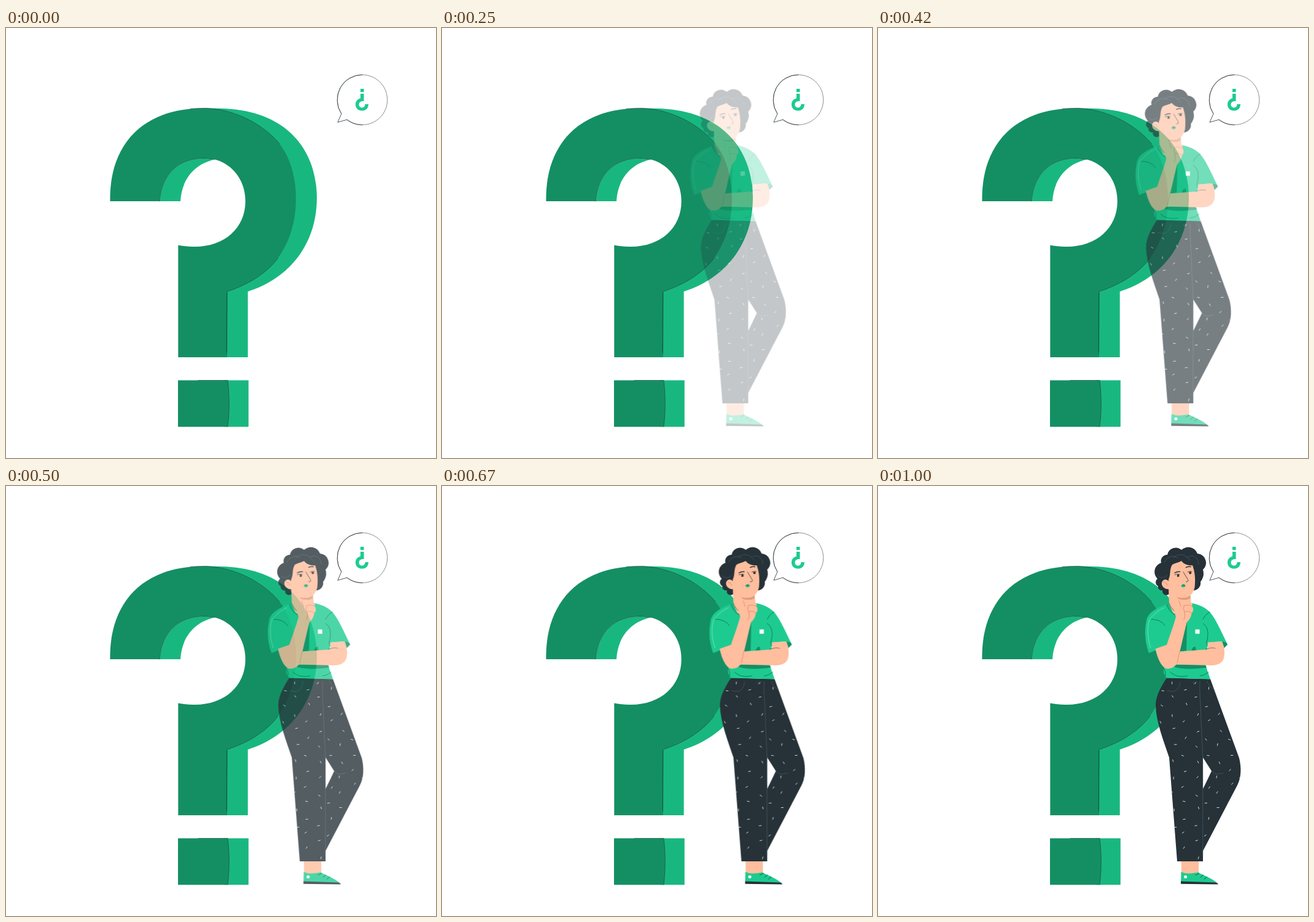
Write an HTML page that moves like this. It is 700x700 px and loops after 1.04 s.

```html
<!DOCTYPE html>
<html lang="en">
<head>
<meta charset="utf-8">
<title>Thinking it over</title>
<style>
  html, body { margin: 0; width: 100%; height: 100%; overflow: hidden; background: #fff; }
  svg { display: block; width: 100vw; height: 100vh; }
  .green { fill: #1dcb90; }
  .light { fill: #19b780; }
  .deep { fill: #148f64; }
  .ink { fill: #263238; }
  .skin { fill: #ffbe9d; }
  .line, .seam, .crease, .fold { fill: none; stroke-width: .8; stroke-linecap: round; stroke-linejoin: round; }
  .line { stroke: #263238; }
  .seam { stroke: #455a64; }
  .crease { stroke: #d98a68; }
  .fold { stroke: #0e6948; }
  .thin { stroke-width: .55; }
  .brow { stroke-width: 1.5; }
</style>
</head>
<body>
<svg viewBox="0 0 700 700">
  <defs>
    <path id="trousers" fill-rule="evenodd" clip-rule="evenodd" d="M470 312.3C460 328 452 342 452 358C453 385 465 415 474 442L487 611H529V594L585 487C591 475 592 460 588 443L541 314.3ZM529 442L543 464Q537 477 529 493Z"/>
    <clipPath id="cloth"><use href="#trousers"/></clipPath>
  </defs>

  <!-- Question mark -->
  <path class="light" d="M324 130.5L350 131C450 133 506 192 506 277C506 350 463 407 393.7 429V536H358V420L440 290L430 180Z"/>
  <path class="light" d="M250 282C253 238 281 211 325 212L340 214C307 221 286 246 284 282Z"/>
  <path class="deep" d="M169.5 282C168 190 222 130 324 130.5C370 132 416 154 445 188C463 211 472 243 472 278C472 320 459 356 436 383C416 405 388 420 360 429V536H280.3V353.5C288 355 296 355.8 305 356C355 357 389.7 326 389.7 282C389.7 249 370 222 340 214L325 212C281 211 253 238 250 282Z"/>
  <path class="line thin" d="M300 131.5Q312 130.5 324 130.5C370 132 416 154 445 188M443 374Q440 379 436 383C416 405 388 420 360 429M250 282C253 238 281 211 325 212L340 214"/>
  <path fill="#0f5c42" d="M359 430L360.4 429.5L360 532L358.6 526Z"/>
  <path class="light" d="M355 573.5H394.8V649.3H355Z"/>
  <path class="deep" d="M280 573.5H361C364 598 364 625 361 649.3H280Z"/>
  <path class="line thin" d="M313 573.5H361C364 598 364 625 361 649"/>

  <!-- Speech bubble -->
  <path class="line thin" d="M555 149.2A40.8 40.8 0 1 0 546 139.5"/>
  <path class="line" d="M580 157.8A40.8 40.8 0 0 1 555 149.2L540 153.5L546 139.5A40.8 40.8 0 0 1 580 76.2"/>
  <path class="green" d="M577 99h5.6v5.2H577ZM577 107h5.6v12C577.5 118.5 574.5 121 574.5 124.5C574.5 127.5 576.5 129.5 579.5 129.5C582.5 129.5 584.5 127.5 584.5 124H590C590 131 585.5 134.6 579.5 134.6C573 134.6 569 130.5 569 124.5C569 119 572.5 115.5 577 114.5Z"/>

  <g id="person" opacity="0">
    <!-- Shoe and ankle -->
    <path class="skin" d="M493.5 608H522V632H494Z"/>
    <path class="green" d="M493.5 628C503 633.5 515 629.5 521 629C531 634 546 640 553 647L493 645Z"/>
    <path class="ink" d="M493 643.4L550 645.6Q554 647 553.5 648.4L493 647.8Z"/>
    <circle cx="500.6" cy="636.3" r="2.5" fill="#fff"/>
    <path class="line" d="M517 633.5L522.5 630.5M525 637L529.5 633M531 640L535.5 636.5"/>

    <!-- Trousers -->
    <use href="#trousers" class="ink"/>
    <path class="seam" d="M524 318C523 340 526 360 526 385L528.7 440V602M471 333C482 337 491 333 492 319M536 318Q538 326 545 330M543 464C549 471 555 469 562 467"/>
    <circle class="seam" cx="515" cy="321" r="2"/>
    <path id="flecks" clip-path="url(#cloth)" fill="none" stroke="#e8eef0" stroke-width=".9" stroke-linecap="round"/>

    <!-- Hair behind the face, neck -->
    <path class="ink" d="M476 172A6 6 0 0 1 463 170A6 6 0 0 1 456 163A7 7 0 0 1 455 151A15.5 15.5 0 0 1 461 125A10 10 0 0 1 471 112A14 14 0 0 1 494 104A16 16 0 0 1 520 110A15 15 0 0 1 529 136A22 22 0 0 1 525 156A12 12 0 0 1 515 170Z"/>
    <path class="skin" d="M473 165L474 193L482 210L500 212L510 193L508 172Z"/>
    <path fill="#e09a78" d="M485 178Q497 186 508.5 178L508 184Q496 187 487 183Z"/>

    <!-- Shirt -->
    <path class="green" d="M470 192C452 199 439 207 437 219C433 238 435 256 441 272L470 260L466 296C463 303 467 309 470 312.5L541 314.5C538 305 535 298 533 291L537 255L560 253L563.5 263.5L569 258C558 235 549 215 540 205C532 197 520 192 509 190.5C508 200 502 209 492 211C481 209 475 203 470 192Z"/>
    <path class="deep" d="M560 253L563.5 263.5L569 258L567 255ZM503 222L502 268L489 270ZM478 291L533 291L535 295.5Q503 300 484 295ZM510 268.5Q512 261 516.5 261.5L518 268Z"/>
    <path class="fold" d="M470 193C474 204 480 209 487 211.5M445 217C455 217 463 221 467 227M529 217Q533 209 540 205M529 224C537 228 539 240 535 254Q534 260 539 262M476 303C484 311 496 311 504 309M538 303Q530 309 524 309M466 298Q469 304 468 309M474 191Q477 199 482 203"/>
    <path fill="none" stroke="#8be6c7" stroke-width=".8" d="M444 264C438 246 438 229 442 217Q454 203 466 198"/>
    <rect x="516.5" y="233.5" width="7" height="7" fill="#fff"/>

    <!-- Head -->
    <path class="skin" d="M473 152C477 144 474 136 479 128C484 125 489 125 494 122C498 128 507 130 512 129C516 140 517 152 515.5 165C513 176 506 182 497 182C488 183 482 179 478 172L473 168C466 168 461 163 462 157C464 151 470 151 473 155Z"/>
    <path class="crease" d="M465 157Q470 156 471 162"/>
    <path class="line brow" d="M483 141.5Q487 138.8 491.5 139.6M501.5 132.6Q505 130.6 509 131.6"/>
    <path class="line" d="M483 144.5Q487 142.3 491 143.8M504 140Q508 137.8 511 139.2M497 140L504.5 152.5Q506 156 501.5 156"/>
    <circle class="ink" cx="488.6" cy="146" r="2"/>
    <circle class="ink" cx="508.2" cy="141.6" r="2"/>
    <path class="deep" d="M493.5 163Q495 159.5 497.5 160.2Q500.5 160 500.2 163Q498.5 165.6 496 164.8Z"/>
    <path class="green" d="M493.5 163Q497 161.8 500.2 163Q498.5 165.6 496 164.8Z"/>
    <path class="seam" d="M466 124C472 114 481 112 488 117M481 117C490 108 501 111 508 121M503 116C513 110 522 117 522 127M456 146C460 151 467 150 471 145"/>

    <!-- Folded arm -->
    <path class="skin" d="M484 270L536 266Q538 260 537 254.5L560 253C564 262 565 272 563 280C561 288 553 292 543 292L482 290.5Z"/>
    <path class="line thin" d="M533 266Q543 262 549 264.2"/>

    <!-- Raised arm and hand -->
    <path class="skin" d="M451.5 265L470 258.5C475 243 481 228 485 213C482 205 480.5 190 479.5 176C480 172 484.5 173 485.5 177L490 187C496 190 500 190 503 188L506 183Q509 183 508.5 189C511.5 190 512 193 511.5 196C514 199 513.5 205 510.5 207C510 213 507 218 502.5 222L487 288C483 296 475 298.5 468 297C460 292 455 280 451.5 265Z"/>
    <path class="crease" d="M490 187L493 196M498 195Q505 192 511.5 196M499 205Q505 202 510.5 207M498 195Q496 200 499 205Q501 212 498 218M487 288L491 269"/>
  </g>
</svg>
<script>
  const LOOP = 1040, TRAVEL = 42, FPS = 24, LEAD = .025;
  const $ = id => document.getElementById(id);

  // Seeded random numbers from 0 to 1
  let seed = 7;
  const random = () => (seed = seed * 16807 % 2147483647) / 2147483647;
  const jitter = size => (random() - .5) * size;

  // Flecks: a staggered, shaken grid, clipped to the cloth
  function fleckPath() {
    let d = '';
    for (let row = 0; row < 23; row++) {
      for (let col = 0; col < 5; col++) {
        const x = 444 + col * 37 + row % 2 * 18 + jitter(8);
        const y = 319 + row * 13 + jitter(7);
        const angle = random() * Math.PI;
        const dx = 1.7 * Math.cos(angle), dy = 1.7 * Math.sin(angle);
        d += `M${x - dx} ${y - dy}L${x + dx} ${y + dy}`;
      }
    }
    return d;
  }
  $('flecks').setAttribute('d', fleckPath());

  const bezier = (a, b, s) => 3 * (1 - s) ** 2 * s * a + 3 * (1 - s) * s * s * b + s ** 3;

  // Eased progress with a soft overshoot; x is found by bisection
  function ease(x) {
    let low = 0, high = 1;
    for (let i = 0; i < 24; i++) {
      const mid = (low + high) / 2;
      if (bezier(.36, .5, mid) < x) low = mid; else high = mid;
    }
    return bezier(-.01, 1.38, low);
  }

  // Slide and fade in, held on each step
  const pose = (p, offset) => ({
    offset,
    opacity: Math.max(0, Math.min(1, p)),
    transform: `translateX(${(p - 1) * TRAVEL}px)`,
    easing: 'step-end'
  });
  const steps = Array.from({ length: FPS + 1 }, (_, n) =>
    pose(ease(Math.min(1, n / FPS + LEAD)), Math.round(n * 100 / FPS) * 10 / LOOP));
  $('person').animate([...steps, pose(1, 1)], { duration: LOOP, iterations: Infinity });
</script>
</body>
</html>
```
